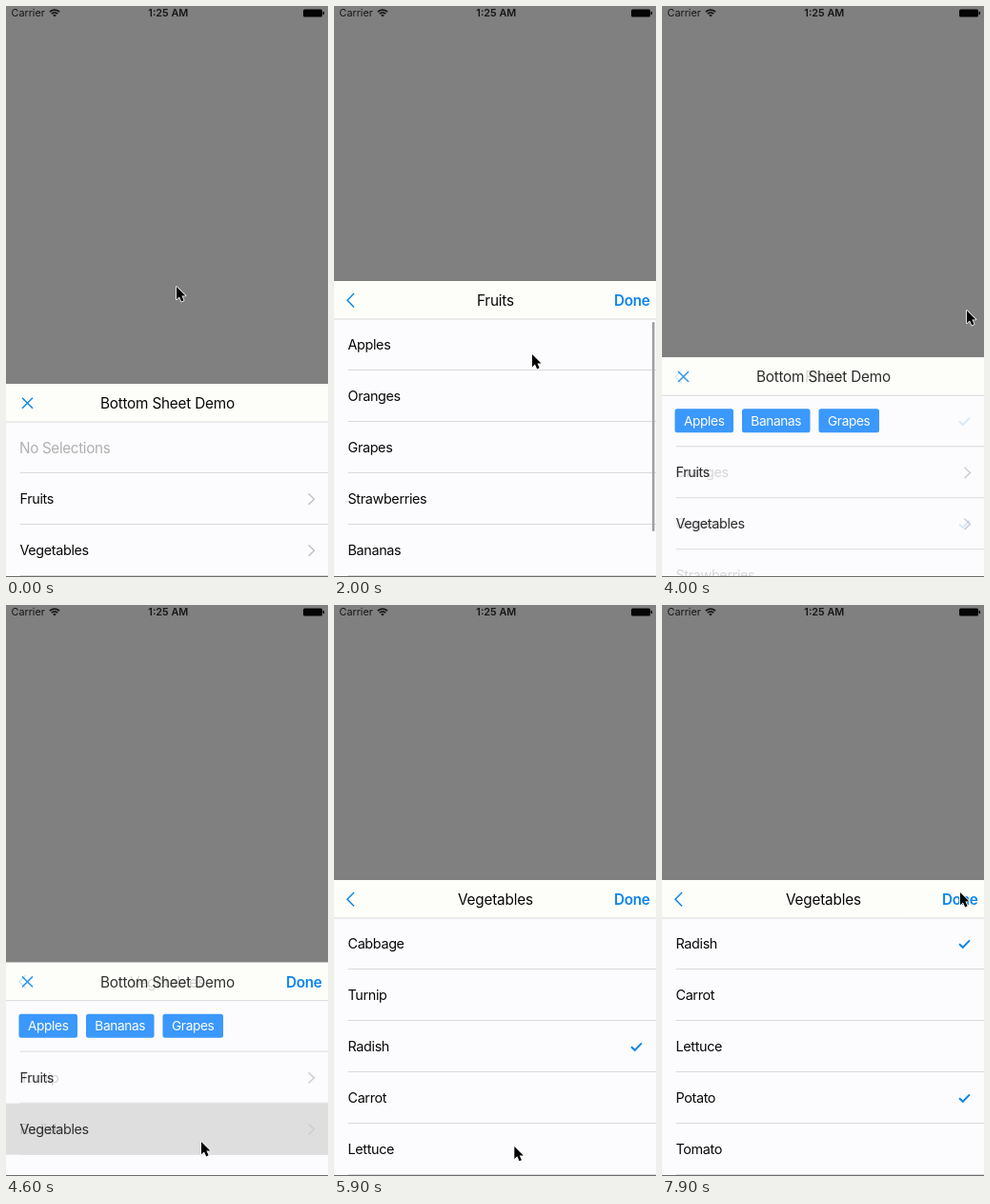
Write an HTML page that moves like this. It is 338 by 600 pixels and loops after 8 s.

```html
<!DOCTYPE html>
<html lang="en">
<head>
<meta charset="utf-8">
<title>Bottom sheet</title>
<style>
  html, body { margin: 0; width: 100%; height: 100%; overflow: hidden; background: #808080; }
  svg { display: block; width: 100%; height: 100%; }
  text { font-family: Inter, Roboto, "Liberation Sans", sans-serif; letter-spacing: -0.36px; fill: #080808; }
  .title { font-size: 15.3px; letter-spacing: -0.2px; text-anchor: middle; }
  .row { font-size: 14.4px; }
  .hint { font-size: 15.3px; fill: #b0b0b0; }
  .chip { font-size: 13.7px; fill: #fff; text-anchor: middle; }
  .done { font-size: 15.3px; font-weight: 600; fill: #0a84ee; }
  .status { font-size: 10.8px; letter-spacing: 0; fill: #161616; }
  .clock { font-weight: 600; text-anchor: middle; }
  .blue { fill: none; stroke: #0f86e6; }
  .arrow { fill: none; stroke: #c4c4c8; stroke-width: 1.5; }
  .line { fill: #d9d9dc; }
  .press { fill: #d9d9d9; }
</style>
</head>
<body>
<svg id="stage" viewBox="0 0 338 600">
  <clipPath id="below"><rect y="40" width="338" height="400"/></clipPath>
</svg>
<script>
const LOOP = 8000, STEP = 100, ROW = 54, HEAD = 40, VIEW = 270;
const MAIN_TOP = 396, SUB_TOP = 289;
const FRUITS = ["Apples", "Oranges", "Grapes", "Strawberries", "Bananas", "Pears"];
const VEGETABLES = ["Cabbage", "Turnip", "Radish", "Carrot", "Lettuce", "Potato", "Tomato"];

const CHANGE_TIME = 500, TRAVEL = 350, HOLD = 100;
const CHANGES = [
  { start: 1260, from: "main", to: "fruits" },
  { start: 3750, from: "fruits", to: "main" },
  { start: 4550, from: "main", to: "vegetables" }
];

// Where the pointer arrives, and the row it taps there
const STOPS = [
  { time: 0, x: 179, y: 295 },
  { time: 1050, x: 158, y: 530, page: "main", row: 1 },
  { time: 2000, x: 208, y: 366, page: "fruits", row: 0 },
  { time: 2400, x: 178, y: 526 },
  { time: 2650, x: 178, y: 564, page: "fruits", row: 4 },
  { time: 3300, x: 188, y: 460, page: "fruits", row: 2 },
  { time: 3700, x: 320, y: 320 },
  { time: 4350, x: 205, y: 564, page: "main", row: 2 },
  { time: 4950, x: 210, y: 380 },
  { time: 5300, x: 212, y: 465, page: "vegetables", row: 2 },
  { time: 5950, x: 188, y: 575 },
  { time: 6300, x: 183, y: 499 },
  { time: 6900, x: 192, y: 512, page: "vegetables", row: 5 },
  { time: 7850, x: 313, y: 302 }
];

const stage = document.getElementById("stage");

function set(node, attrs) {
  for (const key in attrs) node.setAttribute(key, attrs[key]);
}
function add(parent, tag, attrs = {}, text) {
  const node = document.createElementNS("http://www.w3.org/2000/svg", tag);
  set(node, attrs);
  if (text) node.textContent = text;
  parent.append(node);
  return node;
}
const rect = (p, x, y, width, height, more) => add(p, "rect", { x, y, width, height, ...more });
const label = (p, x, y, text, cls) => add(p, "text", { x, y, class: cls }, text);
const path = (p, d, more) => add(p, "path", { d, ...more });
const show = (node, opacity) => set(node, { opacity });

const clamp = v => Math.max(0, Math.min(1, v));
const mix = (a, b, p) => a + (b - a) * p;
const smooth = p => p * p * (3 - 2 * p);
const easeOut = p => 1 - (1 - p) ** 2;
const bounce = p => 1 + 2.7 * (p - 1) ** 3 + 1.7 * (p - 1) ** 2;
// Fades in after start and out before end
const pulse = (t, start, end) => clamp(Math.min(t - start, end - t) / 150);

function statusBar() {
  label(stage, 5.5, 11.2, "Carrier", "status");
  label(stage, 170.3, 11.2, "1:25 AM", "status clock");
  const ink = { fill: "none", stroke: "#161616", "stroke-width": 1.6 };
  path(stage, "M45.8 6.2Q51 1.9 56.2 6.2M47.7 8.2Q51 5.4 54.3 8.2", ink);
  path(stage, "M49.2 9.7Q51 8 52.8 9.7L51 11.6Z", { fill: "#161616" });
  rect(stage, 312, 3.5, 20, 8, { rx: 1.5, fill: "#050505" });
  rect(stage, 332.6, 5.8, 1.4, 3.4, { rx: 0.7, fill: "#050505" });
}

function makePage(name, title, items) {
  const list = add(lists, "g"), body = add(list, "g"), head = add(heads, "g");
  const page = { list, body, head, press: [], checks: [], total: items.length * ROW };
  items.forEach((item, i) => {
    const y = HEAD + i * ROW;
    page.press[i] = rect(body, 0, y, 338, ROW, { class: "press", opacity: 0 });
    rect(body, 14.5, y + ROW - 1, 323.5, 1, { class: "line" });
    if (item) label(body, 14.5, y + 32, item, "row");
    if (name !== "main") {
      page.checks[i] = path(body, `M312 ${y + 27.2}l3.8 3.6l7.2 -7.4`, { class: "blue", "stroke-width": 2 });
    } else if (item) {
      path(body, `M317.5 ${y + 21.5}l6 5.7l-6 5.7`, { class: "arrow" });
    }
  });
  page.bar = rect(list, 334, 0, 2.5, 0, { rx: 1.2, fill: "#a0a0a0" });
  label(head, 169.4, 25.9, title, "title");
  const mark = name === "main" ? "M17 14.7l11 11M28 14.7l-11 11" : "M21 13l-7 7.2l7 7.2";
  path(head, mark, { class: "blue", "stroke-width": 1.5 });
  return page;
}

function makeChips(parent) {
  const group = add(parent, "g");
  let x = 13.5;
  for (const [text, width] of [["Apples", 61.5], ["Bananas", 71.5], ["Grapes", 63.5]]) {
    rect(group, x, 54, width, 25, { rx: 2.5, fill: "#3b98fc" });
    label(group, x + width / 2, 71.6, text, "chip");
    x += width + 9;
  }
  return group;
}

rect(stage, 0, 0, 338, 600, { fill: "#808080" });
statusBar();
const sheet = add(stage, "g");
rect(sheet, 0, 0, 338, 400, { fill: "#fcfcfe" });
const lists = add(sheet, "g", { "clip-path": "url(#below)" });
rect(sheet, 0, 0, 338, HEAD, { fill: "#fdfdfa" });
rect(sheet, 0, HEAD - 0.5, 338, 1, { class: "line" });
const heads = add(sheet, "g");
const done = label(sheet, 294, 25.9, "Done", "done");
const pages = {
  main: makePage("main", "Bottom Sheet Demo", ["", "Fruits", "Vegetables"]),
  fruits: makePage("fruits", "Fruits", FRUITS),
  vegetables: makePage("vegetables", "Vegetables", VEGETABLES)
};
const hint = label(pages.main.body, 14, HEAD + 32.6, "No Selections", "hint");
const chips = makeChips(lists);
rect(stage, 0, 599, 338, 1, { fill: "#6c6c6a" });
const pointer = path(stage, "M0 0V13.2L3 10.4L5.2 15.4L7.6 14.3L5.4 9.5H9.5Z", {
  fill: "#000", stroke: "#fff", "stroke-width": 1.6, "stroke-linejoin": "round", "paint-order": "stroke"
});

// Visible amount of each page and the top edge of the sheet
function layout(t) {
  const topOf = name => name === "main" ? MAIN_TOP : SUB_TOP;
  const fade = { main: 1, fruits: 0, vegetables: 0 };
  let top = MAIN_TOP + 1 - easeOut(clamp(t / 300));
  for (const { start, from, to } of CHANGES) {
    if (t < start) break;
    const p = clamp((t - start) / CHANGE_TIME);
    fade[to] = clamp(p * 1.7);
    fade[from] = 1 - fade[to];
    top = mix(topOf(from), topOf(to), easeOut(p));
  }
  return { fade, top };
}

function drawList(page, scroll, barOpacity) {
  const track = VIEW - 6, over = Math.max(0, scroll - (page.total - VIEW));
  set(page.body, { transform: `translate(0 ${-scroll})` });
  set(page.bar, {
    y: HEAD + 3 + scroll / page.total * track,
    height: track * Math.min(1, VIEW / page.total) - over,
    opacity: barOpacity
  });
}

function drawTaps(t) {
  for (const { time, page, row } of STOPS) {
    if (!page) continue;
    const down = time + 50, up = down + (page === "main" ? CHANGE_TIME + HOLD : HOLD);
    const { press, checks } = pages[page];
    show(press[row], t < down ? 0 : 1 - clamp((t - up) / 150));
    if (checks[row]) show(checks[row], t < up ? 0 : 1);
  }
}

function drawPointer(t) {
  let { x, y } = STOPS[0];
  for (let i = 1; i < STOPS.length; i++) {
    const stop = STOPS[i], time = Math.min(TRAVEL, stop.time - STOPS[i - 1].time);
    const p = smooth(clamp((t - stop.time + time) / time));
    x = mix(x, stop.x, p);
    y = mix(y, stop.y, p);
  }
  set(pointer, { transform: `translate(${x} ${y})` });
}

function draw(t) {
  const { fade, top } = layout(t);
  set(sheet, { transform: `translate(0 ${top})` });
  for (const name in pages) {
    show(pages[name].list, fade[name]);
    show(pages[name].head, fade[name]);
    pages[name].checks.forEach(check => show(check, 0));
  }
  const flick = clamp((t - 6000) / 750);
  drawList(pages.main, 0, 0);
  drawList(pages.fruits, 0, pulse(t, 1650, 2300));
  drawList(pages.vegetables, (pages.vegetables.total - VIEW) * bounce(flick),
    pulse(t, 5000, 5800) + pulse(t, 6000, 7200));
  drawTaps(t);
  const picked = t >= CHANGES[1].start;
  show(hint, picked ? 0 : 1);
  show(chips, picked ? clamp(fade.main * 1.2) : 0);
  show(done, pulse(t, 100, 3900) + pulse(t, 4100, LOOP + 200));
  drawPointer(t);
}

const begin = performance.now();
function tick() {
  const t = (performance.now() - begin) % LOOP;
  draw(Math.floor(t / STEP) * STEP);
  requestAnimationFrame(tick);
}
draw(0);
requestAnimationFrame(tick);
</script>
</body>
</html>
```
